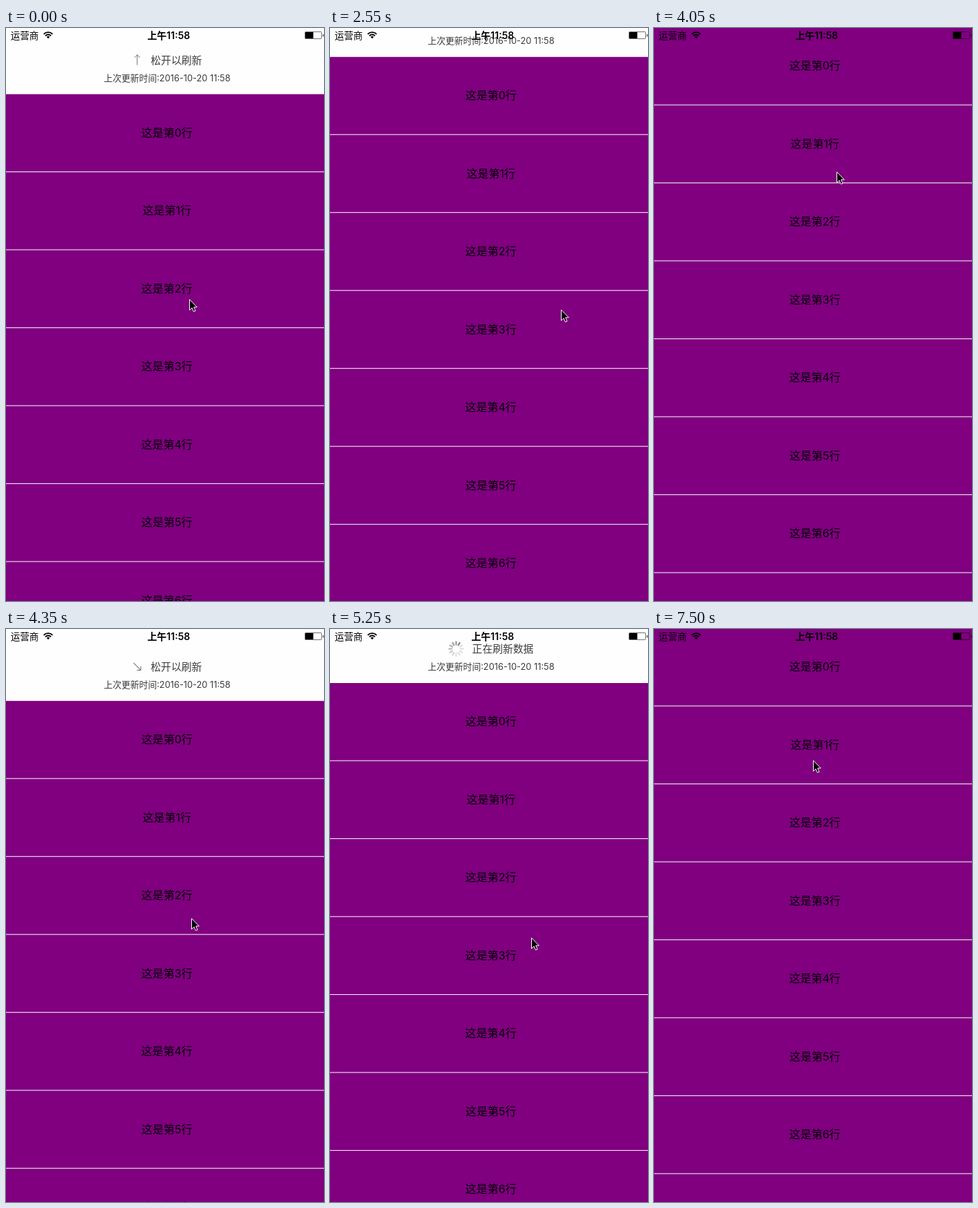
These frames come from a looping animation (460x827 px, 8 s). An HTML page:

```html
<!DOCTYPE html>
<html lang="zh-CN">
<head>
<meta charset="utf-8">
<title>Pull to refresh</title>
<style>
  html, body { margin: 0; width: 100%; height: 100%; overflow: hidden; background: #fefefe; }
  svg { display: block; width: 100%; height: 100%; }
  text { font-family: Inter, "Noto Sans CJK SC", "Noto Sans CJK", sans-serif; }
  .middle { text-anchor: middle; }
  .header { fill: #3c3c3c; }
</style>
</head>
<body>
<svg viewBox="0 0 460 827" xmlns="http://www.w3.org/2000/svg">
  <rect width="460" height="827" fill="#fefefe"/>
  <rect id="table" width="460" height="960" fill="#800080"/>
  <g id="rows" class="middle" font-size="16"></g>
  <g id="header" class="header middle">
    <path id="arrow" d="M0-7.5V7.3M-4 3.3L0 7.3L4 3.3" fill="none" stroke="#707070"/>
    <g id="spinner" transform="translate(182.5 -49.3)" stroke="#858585" stroke-width="2.2" stroke-linecap="round"></g>
    <text id="title" y="-44" font-size="14.8"></text>
    <text x="233" y="-19" font-size="12.8">上次更新时间:2016-10-20 11:58</text>
  </g>
  <g id="status">
    <text x="6.7" y="15.7" font-size="13.5">运营商</text>
    <g fill="none" stroke="#000" stroke-width="1.9">
      <path d="M54.6 8.8A9 9 0 0 1 67.4 8.8M57 11.2A5.7 5.7 0 0 1 65 11.2"/>
      <path d="M61 15.2L58.7 12.8A3.3 3.3 0 0 1 63.3 12.8Z" fill="#000" stroke="none"/>
    </g>
    <text class="middle" x="235.3" y="15.8" font-size="14" font-weight="600">上午11:58</text>
    <rect x="432.5" y="5.5" width="24" height="10" rx="1" fill="none" stroke="#000" stroke-opacity=".55"/>
    <rect x="433" y="6" width="11.5" height="9"/>
    <rect x="458" y="9" width="1.5" height="3.5" opacity=".6"/>
  </g>
  <path id="cursor" d="M-.5.8V16.2L3.1 12.9L5.4 18.3L8 17.2L5.7 11.9H10.3Z" stroke="#fff" stroke-linejoin="round"/>
</svg>
<script>
const LOOP = 8000, STEP = 150, LAST = 7500;
const CLOSED = -1, REST = 78, DIP = 14, ROW = 112.5;
const REFRESH = 1241, SETTLE = 150, CLOSE_DELAY = 70, CLOSE = 400, TURN = 230;
const NS = "http://www.w3.org/2000/svg";
const $ = id => document.getElementById(id);

// Each gesture drags the list down by reach, then lets go
const pulls = [
  { grab: -614, drag: 700, reach: 98, release: 1050 },
  { grab: 4140, drag: 321, reach: 119, release: 5060 }
];
// Free pointer movement between and during the gestures
const moves = [
  { start: 880, time: 300, dx: 69, dy: 12 },
  { start: 3200, time: 100, dx: -2, dy: -16 },
  { start: 3300, time: 600, dx: -68, dy: -183 },
  { start: 4300, time: 700, dx: 27, dy: 0 },
  { start: 6600, time: 900, dx: -61, dy: -256 }
];

const progress = (t, start, time) => Math.min(1, Math.max(0, (t - start) / time));
const easeOut = p => 1 - (1 - p) ** 2;
const easeInOut = p => p * p * (3 - 2 * p);
const dragged = (t, { grab, drag, reach }) => reach * easeOut(progress(t, grab, drag));

function listTop(t, pull) {
  if (t < pull.release) return CLOSED + dragged(t, pull);
  const settled = REST - DIP * (1 - easeOut(progress(t, pull.release, SETTLE)));
  const closing = easeInOut(progress(t, pull.release + REFRESH + CLOSE_DELAY, CLOSE));
  return settled + (CLOSED - settled) * closing;
}

function arrowAngle(t, { grab, drag, release }) {
  const up = easeInOut(progress(t, grab + 0.42 * drag, TURN));
  const down = easeInOut(progress(t, release + REFRESH, TURN));
  return -180 * (up - down);
}

// The list follows the pointer at half its speed
function pointerAt(t) {
  let x = 266, y = 198;
  for (const { start, time, dx, dy } of moves) {
    const p = easeOut(progress(t, start, time));
    x += dx * p;
    y += dy * p;
  }
  for (const pull of pulls) y += 2 * dragged(t, pull);
  return [Math.round(x), Math.round(y)];
}

function add(parent, tag, attrs, content = "") {
  const node = document.createElementNS(NS, tag);
  for (const name in attrs) node.setAttribute(name, attrs[name]);
  node.textContent = content;
  parent.append(node);
  return node;
}

const rows = Array.from({ length: 8 }, (_, i) => ({
  label: add($("rows"), "text", { x: 232.7 }, `这是第${i}行`),
  line: add($("rows"), "rect", { width: 460, height: 1.1, fill: "#f0e6f0" })
}));
const spokes = Array.from({ length: 12 }, (_, i) =>
  add($("spinner"), "path", { d: "M0-6.3V-10.2", transform: `rotate(${i * 30})` }));

function draw(t) {
  const pull = pulls.filter(p => p.grab <= t).pop();
  const top = listTop(t, pull);
  const refreshing = t >= pull.release && t < pull.release + REFRESH;

  $("table").setAttribute("y", top);
  rows.forEach(({ label, line }, i) => {
    label.setAttribute("y", top + 61.3 + i * ROW);
    line.setAttribute("y", top + 111.5 + i * ROW);
  });

  $("header").setAttribute("transform", `translate(0 ${top})`);
  $("title").textContent = refreshing ? "正在刷新数据" : top >= REST ? "松开以刷新" : "下拉以刷新";
  $("title").setAttribute("x", refreshing ? 250 : 246.3);
  $("arrow").style.display = refreshing ? "none" : "";
  $("arrow").setAttribute("transform", `translate(189.8 -49.5) rotate(${arrowAngle(t, pull)})`);

  $("spinner").style.display = refreshing ? "" : "none";
  const head = Math.floor((t - 1200) * 0.012 + 0.45);
  spokes.forEach((spoke, i) => {
    const age = (((head - i) % 12) + 12) % 12;
    spoke.setAttribute("opacity", Math.max(0.25, 1 - age * 0.11));
  });

  $("cursor").setAttribute("transform", `translate(${pointerAt(t)})`);
}

const begin = performance.now();
function tick() {
  const t = (performance.now() - begin) % LOOP;
  draw(Math.min(LAST, Math.floor(t / STEP) * STEP));
  requestAnimationFrame(tick);
}
tick();
</script>
</body>
</html>
```
